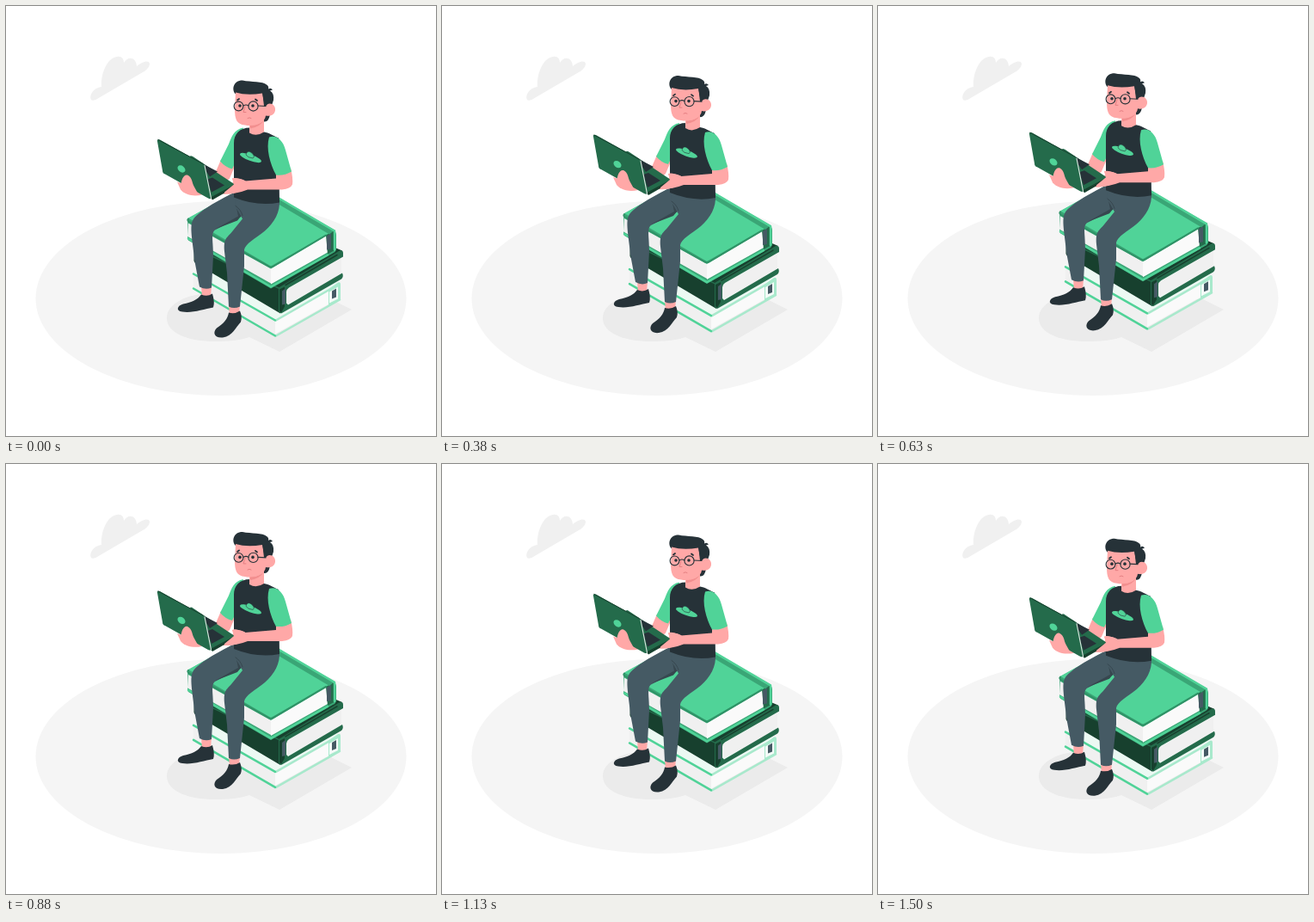
Write an HTML page that moves like this. It is 500 by 500 pixels and loops after 1540 ms.

```html
<!DOCTYPE html>
<html lang="en">
<head>
<meta charset="utf-8">
<title>Reading on books</title>
<style>
  html, body { margin: 0; width: 100%; height: 100%; overflow: hidden; background: #fff; }
  svg { display: block; width: 100vw; height: 100vh; }
  .ink { fill: #263238; }
  .skin { fill: #ffa8a7; }
  .mint { fill: #50d398; }
  .edge { fill: #3aa676; }
  .pine { fill: #246b4b; }
  .deep { fill: #17402e; }
  .slate { fill: #455a64; }
  .pale { fill: #f0f0f0; }
  .page { fill: #fafafa; }
  .line { fill: none; stroke-linecap: round; stroke-linejoin: round; }
</style>
</head>
<body>
<svg viewBox="0 0 500 500">
  <ellipse cx="250" cy="340" rx="215.500" ry="113" fill="#f5f5f5"/>
  <path fill="#ebebeb" d="M187 363C187 346 211 334 240 334L378 341 402 353 318 402 283 385C272 389 258 390 243 390 211 390 187 380 187 363Z"/>
  <path fill="#f0f0f0" d="M99 109C96 104 102 95 111 94 110 78 118 60 129 59 134 58 137 61 137 66 142 58 151 59 152 70 158 65 166 62 167 67 167 71 163 75 159 77L106 108C103 110 100 110 99 109Z"/>

  <g id="float">
    <g id="bottom-book">
      <path fill="#ecf9f3" d="M217 311 313 364 388 322 290 268Z"/>
      <path class="pale" d="M218 313 313 365V382L218 327Z"/>
      <path class="page" d="M313 365 379 329V344L313 381Z"/>
      <path fill="#a8e9cc" d="M375 329 386 321Q389 320 389 323V341L375 348Z"/>
      <path fill="#f4fbf8" d="M376 332 386 326V340L376 345Z"/>
      <path class="slate" d="M379 331 384 328V338L379 340Z"/>
      <g class="line" stroke-width="2.500">
        <path stroke="#a8e9cc" d="M314 365 387 323M314 383 388 341"/>
        <path stroke="#50d398" d="M218 311 313 365M218 328 313 383"/>
      </g>
    </g>

    <g id="middle-book">
      <path class="deep" d="M219 280 290 242 391 284 326 325 319 357 221 299Q218 297 218.500 294Z"/>
      <path class="pale" d="M325 330 390 293V313L325 347Z"/>
      <path class="pine" d="M317 327 388 284Q392 283 392 287V291L329 327Q326 329 326 332V345L328 347 391 310Q393 314 390 317L320 357 317 355Z"/>
      <path class="deep" d="M318 329 324 326V349L320 356 318 354Z"/>
      <path class="slate" d="M321 331 325 328V346L321 347Z"/>
      <g class="line" stroke-width="1.500">
        <path stroke="#246b4b" d="M220 281 318 328"/>
        <path stroke="#17402e" d="M325 324 385 289"/>
      </g>
    </g>

    <g id="top-book">
      <path class="edge" d="M211 247 286 205 381 260Q384 262 384 266V283Q383 286 380 287L308 328 212 272Q210 269 212 267Z"/>
      <path class="pale" d="M212 252 308 305V322L212 268Z"/>
      <path class="page" d="M308 305 374 266V286L308 323Z"/>
      <path class="pine" d="M372 266 383 260V283L374 288Z"/>
      <path class="slate" d="M373 267 378 264V282L373 283Z"/>
      <path class="mint" d="M212 246 286 205 380 260 375 264 308 302Z"/>
      <path class="edge" d="M290 207 382 260 376 265 290 214Z"/>
      <path class="line" stroke="#2f9367" stroke-width="2" d="M212 247Q210 249 214 251L305 302Q308 304 311 302L372 266"/>
      <path class="line" stroke="#50d398" stroke-width="2.500" d="M212 270 308 326 374 289M290 207 382 261V283"/>
    </g>

    <g id="legs">
      <path class="skin" d="M227 325H239L238 338 228 339ZM259 346H272L271 359 260 360Z"/>
      <path class="ink" d="M227 335Q234 338 240 334 243 344 241 350C230 352 216 357 205 355 197 354 199 348 206 346 216 344 223 341 227 335ZM259 356Q266 358 272 354 275 361 273 367C267 373 264 383 252 385 242 386 240 379 245 374 253 369 258 363 259 356Z"/>
      <path class="slate" d="M264 217C248 225 222 239 217 249 213 257 218 278 219 294L225 326Q232 330 239 327L241 290C241 272 238 264 243 260L284 239 292 220Z"/>
      <path fill="#37474f" d="M243 259 269 249 274 243 268 234 270 244Z"/>
      <path class="slate" d="M266 216 318 224C319 240 312 251 301 261 290 270 278 276 277 283V302L272 349Q265 352 259 349L257 310 254 285C253 270 256 270 262 263L275 247 267 233Z"/>
      <path class="line" stroke="#37474f" d="M267 232Q273 236 275 243"/>
    </g>

    <g id="body">
      <path class="skin" d="M250 178 266 186 260 200 246 212 238 206Z"/>
      <path class="mint" d="M276 141C265 143 262 152 259 160L249 180Q255 187 263 189L270 175Z"/>
      <path class="ink" d="M284 141C271 141 265 149 265 159V222Q292 233 318 228L317 153C310 150 306 147 300 146Z"/>
      <path class="skin" d="M283 132 300 128V146Q291 152 283 147Z"/>
      <path fill="#f28f8f" d="M284 138Q294 139 300 132 296 140 284 142Z"/>
      <g class="mint">
        <ellipse cx="284.500" cy="176" rx="13.200" ry="3.600" transform="rotate(20 284.500 176)"/>
        <path stroke="#263238" stroke-width=".6" d="M279 172.500C280 167.500 284 167.500 288 173Q289 176 287 176.500 281 176 279 172.500Z"/>
      </g>
    </g>

    <g id="head">
      <path class="ink" d="M300 124 307 126Q305 135 300 134Z"/>
      <path class="ink" d="M267 102C262 97 264 86 275 86 285 88 299 87 303 91Q306 93 305 96 308 94 310 97L307 98Q312 101 311 109L308 118 298 112Z"/>
      <path class="skin" d="M267 100Q280 104 298 101L301 116C306 110 314 114 313 121 312 127 306 128 302 127 301 136 288 140 278 138 268 137 266 131 266 119Z"/>
      <path class="ink" d="M266 95Q283 102 298 98L300 116 302 116 308 109 304 95Z"/>
      <g class="line" stroke="#263238">
        <g stroke-width="1.100">
          <circle cx="270.500" cy="116" r="5.400"/>
          <circle cx="287.500" cy="116" r="5.600"/>
          <path d="M276 115.500Q279 113.500 282 115.500M293 115.500 302 116"/>
        </g>
        <path stroke-width="1.800" d="M269 109 271 107.500M290 108 292 109.500"/>
        <path stroke="#e57f82" d="M278 116.500 276 123H279M281 130Q283 128.500 285 130"/>
      </g>
      <g class="ink"><circle cx="272" cy="115.500" r="1.800"/><circle cx="287" cy="115.500" r="1.800"/></g>
    </g>

    <g id="laptop">
      <path class="skin" d="M250 215C257 212 260 207 265 204L263 200Q267 198 278 203L314 200V192L331 188Q334 200 333 207 331 212 321 213L281 213Q266 219 250 218Z"/>
      <path class="pine" d="M214 174Q215 173 218 175L266 207V209L239 224 231 214Z"/>
      <path class="ink" d="M219 178 246 192 237 198 229 186ZM234 201 240 199 254 208 239 216Z"/>
      <path class="deep" d="M238 222 266 207V210L240 225Z"/>
      <path class="skin" d="M199 204 222 212 228 219C219 221 209 220 203 213Z"/>
      <path class="pine" d="M176 157Q175 154 179 155L229 183Q231 184 232 188L239 221Q239 225 235 223L185 195Q182 194 182 191Z"/>
      <path class="line" stroke="#d9e6df" stroke-width="1.100" d="M231 185 238.500 223"/>
      <path class="line" stroke="#17402e" d="M177 155 229 183"/>
      <ellipse class="mint" cx="204" cy="189" rx="5" ry="3.600" transform="rotate(38 204 189)"/>
      <path class="skin" d="M203 209C204 202 206 195 211 196 217 199 216 205 219 210L224 219Q212 221 203 209Z"/>
      <path class="skin" d="M254 216 265 207 263 200Q273 199 280 204L278 212Q266 219 254 218Z"/>
      <path class="mint" d="M306 152C314 149 322 155 325 167L332 192Q324 197 314 196C307 183 302 165 306 152Z"/>
    </g>
  </g>
</svg>
<script>
  const LOOP = 1540, LEAD = 55, HEIGHT = 8.6, REST = 0.7;
  const float = document.getElementById("float");

  function draw(now) {
    const rise = Math.sin((now + LEAD) % LOOP / LOOP * Math.PI) ** 1.7;
    float.setAttribute("transform", `translate(0 ${(REST - HEIGHT * rise).toFixed(3)})`);
    requestAnimationFrame(draw);
  }
  draw(0);
</script>
</body>
</html>
```
